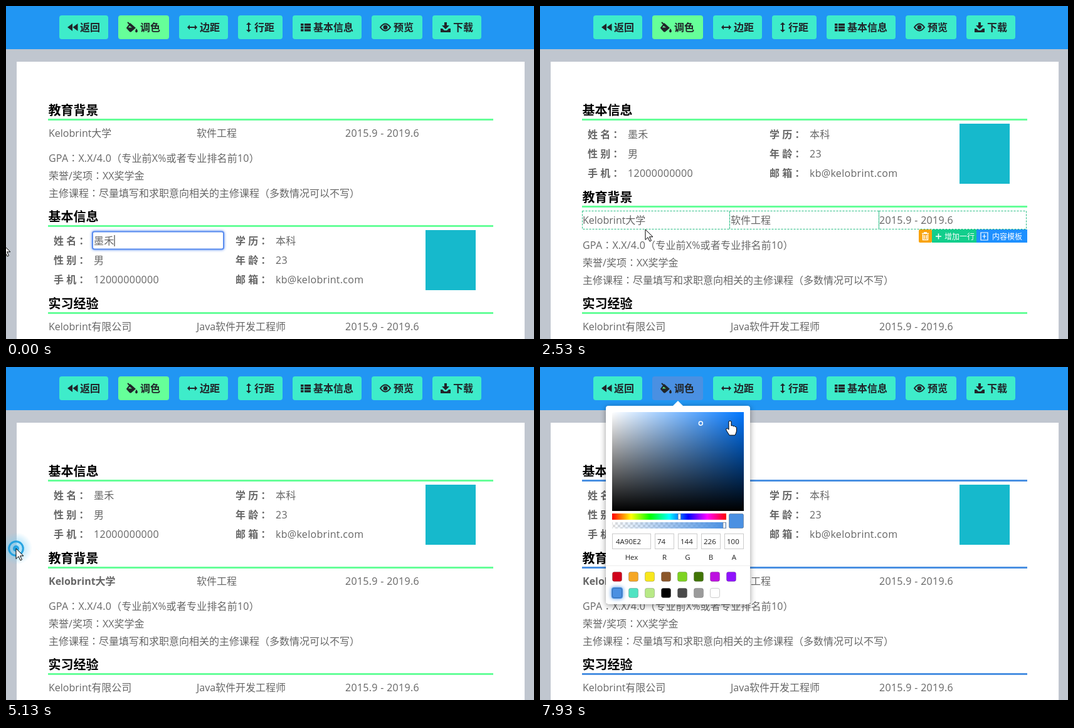
Animation, 842 px wide and 532 px high, one loop 8 s. Source, as an HTML page:

```html
<!DOCTYPE html>
<html lang="zh-CN">
<head>
<meta charset="utf-8">
<title>Resume editor</title>
<style>
html, body { margin: 0; width: 100%; height: 100%; overflow: hidden; background: #c0c6cf; }
svg { display: block; width: 842px; height: 532px; --c: #66ff99;
  font-family: "Open Sans", "Noto Sans CJK SC", "Noto Sans CJK", sans-serif; fill: #666; }
.b { font-weight: 700; }
.h { font-weight: 700; fill: #000; }
.n { letter-spacing: .3px; }
.mid { font-family: "Noto Sans CJK TC", "Noto Sans CJK", sans-serif; }
.acc { fill: var(--c); }
.out, .cell { fill: none; stroke-dasharray: 3 2; }
.out { stroke: #2196b8; }
.cell { stroke: #25bd82; }
.focus { fill: #fff; stroke: #5b8def; stroke-width: 2; filter: drop-shadow(0 0 2px #5b8def); }
.ico { fill: none; stroke: #fff; stroke-width: 1.7; }
.dark { fill: #212529; }
.dark .ln { fill: none; stroke: #212529; stroke-width: 2; }
</style>
</head>
<body>
<svg id="stage" viewBox="0 0 842 532"></svg>
<script>
// Full-width punctuation is set in the face that centres it
const T = (x, y, str, size = 16, attr = '') =>
  `<text x="${x}" y="${y + size * .38}" font-size="${size}" ${attr}>` +
  String(str).replace(/[：（）]/g, '<tspan class="mid" lang="zh-Hant">$&</tspan>') + '</text>';
const R = (x, y, w, h, attr = '') => `<rect x="${x}" y="${y}" width="${w}" height="${h}" ${attr}/>`;
const P = (d, attr = '') => `<path d="${d}" ${attr}/>`;
const G = (id, body, attr = '') => `<g id="${id}" ${attr}>${body}</g>`;
const B = 'class="b"', N = 'class="n"';

// Header
const buttons = [
  [85, 78, 118, '返回', P('M106 28v12l-8-6zM114.500 28v12l-8-6z')],
  [179, 81, 214, '调色', P('M198 27l9 8-7 6q-1.500 1-3 0l-4.500-5q-1-1 0-2zM208 36q4 5 0 6.500-4-1.500 0-6.500') +
    P('M194 26l6 6', 'class="ln"') + P('M197 31.500l4 3h-6z', 'fill="#5fe98c"')],
  [276, 78, 309, '边距', P('M289 34l4-4v3h8v-3l4 4-4 4v-3h-8v3z')],
  [370, 71, 396, '行距', P('M387 26l4 4h-3v8h3l-4 4-4-4h3v-8h-3z')],
  [457, 110, 490, '基本信息', [28, 32.5, 37].map(y => R(470, y, 4.5, 3.5) + R(476, y, 10, 3.5)).join('')],
  [583, 81, 618, '预览', P('M597 34q8-11 16 0-8 11-16 0z', 'class="ln"') + '<circle cx="605" cy="34" r="3.500"/>'],
  [680, 78, 713, '下载', P('M699 26h4v5h4l-6 6-6-6h4zM693 36h3l3 3h4l3-3h3v6h-16z')]
];
const header = R(0, 0, 842, 69, 'fill="#2196f3"') + buttons.map(([x, w, tx, s, icon], i) =>
  R(x, 15, w, 38, `rx="4" ${i == 1 ? 'class="acc"' : 'fill="#3eecca"'}`) +
  `<g class="dark">${icon}${T(tx, 34, s, 16, B)}</g>`).join('');

// Resume sections, each drawn around the centre of its title
const section = (title, h) => P(`M66.500-17v${h}M777.500-17v${h}`, 'class="out"') +
  T(67.5, 0, title, 20, 'class="h"') + R(67, 14, 710, 3, 'class="acc"');
const plusBox = 'M99 5h11v12h-11zM104.500 7.500v7M101.500 11h6';
const tools = (x, y) => `<g transform="translate(${x} ${y})" fill="#fff">` +
  R(0, 0, 21, 21, 'rx="2" fill="#f9a30d"') + R(21, 0, 71, 21, 'fill="#12ce8c"') + R(92, 0, 81, 21, 'fill="#1e90ff"') +
  P('M5 6.500h11M8 5h5M6.500 8v8.500h8V8M9 9v6M12 9v6M27 11h9M31.500 6.500v9', 'class="ico" style="stroke-width:1.500"') +
  P(plusBox, 'class="ico" style="stroke-width:1.200"') +
  T(41, 11, '增加一行', 12) + T(117, 11, '内容模板', 12) + '</g>';
const fields = [
  ['姓', '名', '墨禾', '学', '历', '本科'],
  ['性', '别', '男', '年', '龄', '23'],
  ['手', '机', '12000000000', '邮', '箱', 'kb@kelobrint.com']
];
const photo = x => R(x, 22, 80, 96, 'fill="#16b9cc"');
const info = section('基本信息', 139) + G('nameBox', R(138, 24.5, 209, 28, 'rx="3" class="focus"') +
    R(172.5, 30, 1, 18, 'fill="#222"')) +
  fields.map(([a, b, v, c, d, w], i) => {
    const y = 39 + 31 * i;
    return T(76, y, `${a} ${b}：`, 16, B) + T(140, y, v, 16, N) +
      T(366, y, `${c} ${d}：`, 16, B) + T(430, y, w, 16, N);
  }).join('') + photo(669);
const edu = section('教育背景', 170) +
  G('rowFocus', R(68, 22.5, 235, 29, 'rx="3" class="focus"')) +
  G('select', R(68, 26, 100, 22, 'fill="#3390ee"')) +
  T(68, 37, 'Kelobrint大学', 16, 'id="school"') + T(304, 37, '软件工程') + T(541, 37, '2015.9 - 2019.6', 16, N) +
  T(68, 77, 'GPA：X.X/4.0（专业前X%或者专业排名前10）', 16, 'style="letter-spacing:.2px"') +
  T(68, 105, '荣誉/奖项：XX奖学金') +
  T(68, 133, '主修课程：尽量填写和求职意向相关的主修课程（多数情况可以不写）') +
  G('paraHover', R(66.5, 62.5, 711, 85, 'class="cell"')) +
  G('rowHover', [[67.5, 235], [302.5, 238], [540.5, 235]].map(([x, w]) =>
    R(x, 22.5, w, 29, 'class="cell"')).join(''));
const work = section('实习经验', 120) + T(68, 37, 'Kelobrint有限公司') +
  T(304, 37, 'Java软件开发工程师') + T(541, 37, '2015.9 - 2019.6', 16, N);

// Dragged copy, with its narrower wrapped table
const tight = 'style="letter-spacing:-.55px"';
const ghost = T(67.5, 0, '基本信息', 20, 'class="h" style="fill:#222"') + R(67, 14, 710, 3, 'class="acc"') +
  photo(468) + fields.map(([a, b, v, c, d, w], i) => {
    const y = [39, 114, 167][i], z = i ? y : 60;
    return T(76, y, a, 16, B) + T(76, y + 23, b + '：', 16, B) + T(131, y, v, 16, tight) +
      T(331, z, c, 16, B) + T(331, z + 23, d + '：', 16, B) + T(386, z, w, 16, tight);
  }).join('');

// Text toolbar
const lines = (x, y, ws, k) => ws.map((w, i) => `M${x - 8 + (16 - w) * k} ${y - 6 + i * 4}h${w}`).join('');
const right = x => `M${x - 2} 295l4 4-4 4`, down = (x, y) => `M${x - 5} ${y - 2}l5 5 5-5`;
const bar = R(67.5, 240.5, 591, 78, 'rx="3" fill="#222f3e" stroke="#000"') +
  P('M177 318h16l-8 9z', 'fill="#222f3e"') +
  P('M68 279.500h590M144.500 241v38M289.500 241v38M558.500 241v38M176.500 280v38M287.500 280v38M396.500 280v38M439.500 280v38', 'stroke="#000"') +
  G('bold', R(149, 243, 34, 34, 'rx="3" fill="#4a5562"')) +
  P('M85 252l-4 5 4 4M81 257h9q6 0 6 5t-4 6M127 252l4 5-4 4M131 257h-9q-6 0-6 5t4 6', 'class="ico" opacity=".500"') +
  P(down(412, 259) + down(542, 259) + down(480, 298) + [114, 164, 333, 383].map(right).join(''),
    'class="ico" style="stroke:#a7adb5;stroke-width:1.500"') +
  '<g fill="#fff">' + T(160, 260, 'B', 19, B) +
  T(195, 260, 'I', 20, 'font-style="italic" font-family="Liberation Serif, serif"') +
  T(228, 259, 'U', 16, B) + R(228, 266, 12, 2) + T(263, 260, 'S', 17, B) + R(260, 259, 16, 2) +
  T(301, 261, '云岭素黑', 14) + T(432, 261, '12pt', 14) +
  T(84, 297, 'A', 15, B) + R(81, 305, 17, 3) + P('M133 301l8-9 5 4-8 8h-5z') + R(131, 305, 17, 3) +
  T(409, 299, 'Ω', 21, 'font-family="DejaVu Sans, sans-serif"') +
  [1, 2, 3].map((n, i) => T(301, 293 + i * 6, n, 7, B)).join('') +
  [293, 299, 305].map(y => R(351, y - 1.5, 3, 3)).join('') + '</g>' +
  P(lines(198, 299, [16, 10, 16, 10], 0) + lines(232, 299, [16, 10, 16, 10], .5) + lines(266, 299, [16, 10, 16, 10], 1) +
    'M307 293h9m-9 6h9m-9 6h9M357 293h10m-10 6h10m-10 6h10M452 293h16v12h-16zM452 297h16M452 301h16M457 293v12M463 293v12', 'class="ico"');

// Colour picker
const stop = (o, c, a = 1) => `<stop offset="${o}" stop-color="${c}" stop-opacity="${a}"/>`;
const grad = (id, stops, attr = '', kind = 'linear') => `<${kind}Gradient id="${id}" ${attr}>${stops}</${kind}Gradient>`;
const defs = '<defs>' + grad('white', stop(0, '#fff') + stop(1, '#fff', 0)) +
  grad('black', stop(0, '#000', 0) + stop(1, '#000'), 'x2="0" y2="1"') +
  grad('rainbow', [0, 1, 2, 3, 4, 5, 6].map(i => stop(i / 6, `hsl(${i * 60} 100% 50%)`)).join('')) +
  grad('alpha', stop(0, 'var(--c)', 0) + stop(1, 'var(--c)')) +
  grad('glow', stop(.3, '#7fd0f5', .65) + stop(1, '#7fd0f5', 0), '', 'radial') +
  '<pattern id="check" width="8" height="8" patternUnits="userSpaceOnUse"><path d="M0 0h4v4H0zM4 4h4v4H4z" fill="#ddd"/></pattern></defs>';
const swatches = 'D0021B F5A623 F8E71C 8B572A 7ED321 417505 BD10E0 9013FE 4A90E2 50E3C2 B8E986 000000 4A4A4A 9B9B9B FFFFFF'.split(' ');
const boxes = [[115, 62, 'Hex'], [183, 31, 'R'], [220, 31, 'G'], [257, 31, 'B'], [294, 31, 'A']];
const picker = R(105, 62, 230, 317, 'rx="4" fill="#fff" style="filter:drop-shadow(0 2px 5px #0006)"') +
  P('M211 63l9-9 9 9z', 'fill="#fff"') +
  R(115, 72, 210, 158, 'id="hue"') + R(115, 72, 210, 158, 'fill="url(#white)"') + R(115, 72, 210, 158, 'fill="url(#black)"') +
  '<circle id="spot" r="3" fill="none" stroke="#fff" stroke-width="1.500"/>' +
  R(115, 234, 182, 10, 'fill="url(#rainbow)"') + R(0, 234.5, 4, 9, 'id="hueKnob" fill="#fff" stroke="#777" stroke-width=".600"') +
  R(115, 248, 182, 10, 'fill="url(#check)"') + R(115, 248, 182, 10, 'fill="url(#alpha)"') +
  R(292, 248.5, 4, 9, 'fill="#fff" stroke="#777" stroke-width=".600"') +
  R(301.5, 234.5, 23, 23, 'rx="2" class="acc" stroke="#0004"') +
  boxes.map(([x, w, s], i) => R(x + .5, 266.5, w - 1, 24, 'fill="#fff" stroke="#ccc"') +
    T(x + (i ? 4 : 6), 279, '', 11.5, 'class="val" fill="#222"') +
    T(x + w / 2, 304, s, 11.5, 'text-anchor="middle" fill="#222"')).join('') +
  R(105, 317, 230, 1, 'fill="#eee"') +
  R(114, 352, 18, 18, 'id="picked" rx="4" fill="#4a90e2" style="filter:drop-shadow(0 0 3px #4a90e2)"') +
  swatches.map((c, i) => R(115.5 + i % 8 * 26, 327.5 + (i >> 3) * 26, 15, 15, `rx="3" fill="#${c}" stroke="#0003"`)).join('');

const pointer = G('arrow', P('M0 0V16.500l4-3.800 3 6.300 2.500-1.200-3-6H12z')) +
  G('hand', P('M-2 1Q0-1 2 1V8Q4 6.500 5 8.500 7 7.500 8 9.500 10 9 10.500 11V16Q10 19 8 23H-1L-6 15Q-7 12-4.500 12L-2 14z')) +
  G('beam', P('M-3-6Q0-6 0-4V4Q0 6-3 6M3-6Q0-6 0-4M0 4Q0 6 3 6', 'style="fill:none"'));

const stage = document.getElementById('stage');
stage.innerHTML = defs + R(0, 0, 842, 532, 'fill="#c0c6cf"') + header + R(17, 89, 810, 443, 'fill="#fff"') +
  G('doc', P('M66 148.500h712', 'class="out"') + G('edu', edu) + G('info', info) +
    G('work', work, 'transform="translate(0 475)"')) +
  G('paraTools', tools(603, 315)) + G('rowTools', tools(604, 357)) + G('ghost', ghost, 'opacity=".900" fill="#555"') +
  G('bar', bar) + G('picker', picker) +
  G('ripple', '<circle r="26" fill="url(#glow)"/><circle r="5" fill="#1a9fe0"/>' +
    '<circle id="ring" fill="none" stroke="#1a9fe0" stroke-width="3"/>') +
  G('pointer', pointer, 'fill="#fff" stroke="#000"');

const $ = id => document.getElementById(id);
const show = (id, on) => $(id).style.display = on ? '' : 'none';
const move = (id, x, y) => $(id).setAttribute('transform', `translate(${x} ${y})`);
const within = (t, a, b) => t >= a && t < b;

// time, x, y, pointer shape from then on
const path = [
  [0, -5, 381, 'arrow'], [270, -5, 381, 'arrow'], [670, 175, 354, 'arrow'], [870, 175, 350, 'beam'],
  [1000, 175, 350, 'beam'], [1270, 136, 238, 'beam'], [1550, 129, 184, 'beam'], [1870, 129, 184, 'arrow'],
  [2470, 168, 357, 'arrow'], [2730, 168, 357, 'beam'], [2900, 155, 347, 'beam'], [3300, 155, 347, 'beam'],
  [3400, 166, 305, 'hand'], [3570, 179, 252, 'hand'], [4400, 179, 252, 'hand'], [4500, 140, 262, 'arrow'],
  [4900, 16, 290, 'arrow'], [5330, 16, 290, 'arrow'], [5800, 224, 22, 'hand'], [5900, 224, 22, 'hand'],
  [6070, 225, 28, 'hand'], [6350, 225, 28, 'hand'], [7070, 123, 357, 'hand'], [7350, 123, 357, 'hand'],
  [7860, 303, 86, 'hand'], [8000, 303, 86, 'hand']
];
function pointerAt(t) {
  const i = path.findLastIndex(p => p[0] <= t);
  const [ta, xa, ya, kind] = path[i], [tb, xb, yb] = path[i + 1];
  const u = (t - ta) / (tb - ta), k = u * u * (3 - 2 * u);
  return [xa + (xb - xa) * k, ya + (yb - ya) * k, kind];
}
const clicks = [[2930, 155, 347], [3230, 155, 347], [3900, 179, 255], [4970, 16, 290], [5870, 224, 22], [7200, 123, 359]];
const colors = [
  { hex: '66FF99', hue: 140, s: .6, v: 1 },
  { hex: '4A90E2', hue: 212, s: .673, v: .886 }
];

function setColor({ hex, hue, s, v }) {
  stage.style.setProperty('--c', '#' + hex);
  $('hue').setAttribute('fill', `hsl(${hue} 100% 50%)`);
  move('spot', 115 + s * 210, 72 + (1 - v) * 158);
  move('hueKnob', 113 + hue / 360 * 182, 0);
  const rgb = [0, 2, 4].map(i => parseInt(hex.slice(i, i + 2), 16));
  const values = [hex, ...rgb, 100];
  document.querySelectorAll('.val').forEach((e, i) => e.textContent = values[i]);
}

function render(t) {
  const [x, y, kind] = pointerAt(t);
  move('pointer', x, y);
  ['arrow', 'hand', 'beam'].forEach(k => show(k, k == kind));

  // The outline's border narrows the page by a pixel on each side
  const outlined = within(t, 930, 1900), dragging = within(t, 1000, 1600), swapped = t >= 1400;
  $('doc').setAttribute('transform', outlined ? 'translate(1.2 1) scale(.9972 1)' : '');
  document.querySelectorAll('.out').forEach(e => e.style.display = outlined ? '' : 'none');
  move('edu', 0, swapped ? 305 : 166);
  move('info', 0, swapped ? 166 : 336);
  $('info').setAttribute('opacity', dragging ? .25 : 1);
  show('nameBox', t < 1600);
  show('ghost', dragging);
  move('ghost', x - 175, y - 350 + 336);
  const para = within(t, 1130, 1400), row = within(t, 2330, 2930);
  show('paraHover', para);
  show('paraTools', para);
  show('rowHover', row);
  show('rowTools', row);

  const selected = within(t, 3230, 4970);
  show('rowFocus', within(t, 2930, 4970));
  show('select', selected);
  $('school').style.fill = selected ? '#fff' : '';
  $('school').style.fontWeight = t >= 3900 ? 700 : 400;
  show('bar', within(t, 3270, 4970));
  show('bold', t >= 3500);

  show('picker', t >= 6260);
  $('picker').setAttribute('opacity', Math.min(1, Math.max(0, (t - 6260) / 200)));
  setColor(colors[+(t >= 7270)]);
  show('picked', t >= 7270);

  const click = clicks.findLast(c => within(t, c[0], c[0] + 600));
  show('ripple', click);
  if (click) {
    const p = (t - click[0]) / 600;
    move('ripple', click[1], click[2]);
    $('ripple').setAttribute('opacity', 1 - p * p);
    $('ring').setAttribute('r', 4 + 18 * p + 34 * p * p);
    $('ring').setAttribute('stroke-width', 4 - 3.5 * p);
  }
}

const start = performance.now();
function tick() {
  render((performance.now() - start) % 8000);
  requestAnimationFrame(tick);
}
tick();
</script>
</body>
</html>
```
